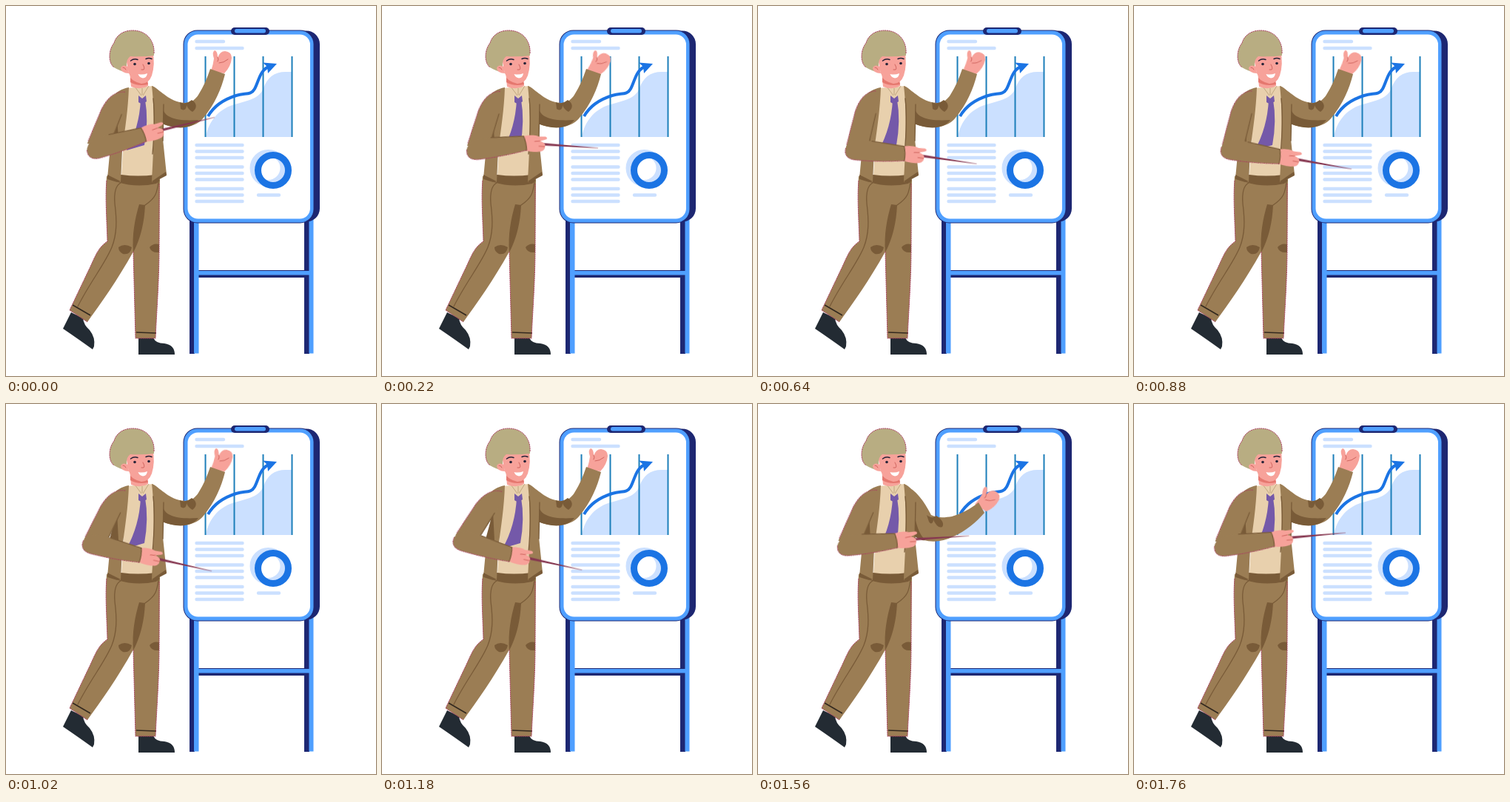
Animation of 500x500 px, one loop 1.8 s. Source, as an HTML page:

```html
<!DOCTYPE html>
<html lang="en">
<head>
<meta charset="utf-8">
<title>Presenter</title>
<style>
  html, body { margin: 0; width: 100%; height: 100%; overflow: hidden; background: #fff; }
  svg { display: block; width: 100vw; height: 100vh; }
  .coat { fill: #9b7d54; }
  .dark { fill: #795b38; }
  .skin { fill: #f7a29a; }
  .navy { fill: #1d2772; }
  .blue { fill: #4f9fff; }
  .pale { fill: #cbe0ff; }
  .crease { fill: none; stroke: #795b38; stroke-width: 1.3; stroke-linecap: round; }
  .fold { fill: none; stroke: #d0655f; stroke-width: 1; stroke-linecap: round; }
  .edge { fill: none; stroke: #a83f5f; stroke-width: 1; stroke-dasharray: 2 .7; }
  .ink { fill: none; stroke: #262338; stroke-width: 1.5; stroke-linecap: round; }

  .upper, .fore, .hand, .wrist, .fist, .sleeve, .under, .bend {
    animation: 1800ms linear infinite;
  }
  .upper { animation-name: upper; }
  .fore { animation-name: fore; }
  .hand { animation-name: hand; }
  .fist { animation-name: fist; }
  .wrist { animation-name: wrist; }
  .sleeve { animation-name: sleeve; }
  .under { animation-name: under; }
  .bend { animation-name: bend; }
  .wrist, .sleeve, .under, .bend { animation-timing-function: ease-in-out; }

  /* Pointing arm: shoulder, elbow and wrist angles */
  @keyframes upper {
    0% { transform: rotate(20.8deg); }
    12.22% { transform: rotate(16deg); }
    25.56% { transform: rotate(12.2deg); }
    48.89% { transform: rotate(12.8deg); }
    60% { transform: rotate(30deg); }
    65.56% { transform: rotate(31.5deg); }
    74.44% { transform: rotate(25deg); }
    91.11%, 100% { transform: rotate(21deg); }
  }
  @keyframes fore {
    0% { transform: rotate(-36.4deg); }
    12.22% { transform: rotate(-22.6deg); }
    25.56% { transform: rotate(-9.8deg); }
    48.89% { transform: rotate(-3.8deg); }
    60% { transform: rotate(-13.5deg); }
    65.56% { transform: rotate(-14.5deg); }
    74.44% { transform: rotate(-24.5deg); }
    91.11%, 100% { transform: rotate(-28deg); }
  }
  @keyframes hand {
    0% { transform: rotate(2deg); }
    12.22% { transform: rotate(10.6deg); }
    25.56% { transform: rotate(4.5deg); }
    48.89% { transform: rotate(1deg); }
    65.56% { transform: rotate(-4.5deg); }
    74.44% { transform: rotate(0deg); }
    91.11%, 100% { transform: rotate(2deg); }
  }

  /* Raised arm: dips once, the fist rocks */
  @keyframes fist {
    0%, 65.56%, 97.78%, 100% { transform: rotate(0deg); }
    12.22% { transform: rotate(13deg); }
    25.56% { transform: rotate(6deg); }
    48.89% { transform: rotate(8deg); }
    74.44%, 88.89% { transform: rotate(22deg); }
  }
  @keyframes wrist {
    0%, 66.67%, 97.78%, 100% { transform: translate(286px, 89px); }
    74.44%, 88.89% { transform: translate(301px, 140px); }
  }
  @keyframes sleeve {
    0%, 66.67%, 97.78%, 100% {
      d: path("M198 110 C212 114 218 129 242 131 C252 130 256 126 260 120 C267 109 272 97 276 85 L296 92 C291 112 282 133 267 151 C256 165 232 168 211 159 Z");
    }
    74.44%, 88.89% {
      d: path("M198 110 C214 116 224 131 234 150 C244 155 254 153 262 152 C276 148 288 141 298 133 L306 147 C295 160 280 172 264 179 C246 188 226 188 211 178 Z");
    }
  }
  @keyframes under {
    0%, 66.67%, 97.78%, 100% { d: path("M212 139 C215 151 231 156 260 154 C250 167 230 167 211 159 Z"); }
    74.44%, 88.89% { d: path("M211 148 C214 163 217 175 226 184 C223 185 217 183 211 178 Z"); }
  }
  @keyframes bend {
    0%, 66.67%, 97.78%, 100% { d: path("M235 130 C240 133 246 131 251 127 C258 131 259 138 252 143 C248 141 245 137 244 134 C244 140 240 142 236 139 Z"); }
    74.44%, 88.89% { d: path("M228 150 C233 154 237 154 241 151 C249 156 252 162 249 166 C244 169 238 160 237 156 C237 162 233 163 231 159 Z"); }
  }
</style>
</head>
<body>
<svg viewBox="0 0 500 500">
  <!-- Easel -->
  <g>
    <path class="navy" d="M248 288H255V470H248ZM403 288H410V470H403ZM260 357H410V367H260Z"/>
    <path class="blue" d="M254 288H260.500V469.500H254ZM409.500 288H415.500V469.500H409.500ZM260 358H409.500V363.500H260Z"/>
    <rect class="navy" x="248" y="33.500" width="176" height="258" rx="18"/>
    <rect class="navy" x="239.500" y="32.500" width="177" height="261" rx="19"/>
    <rect class="blue" x="240.500" y="33.500" width="175" height="259" rx="18"/>
    <rect x="245.500" y="38.500" width="165.500" height="249" rx="14" fill="#fff"/>
    <rect class="navy" x="304" y="29" width="52" height="10" rx="5"/>
    <rect class="blue" x="309" y="31" width="42" height="5.500" rx="2.700"/>
  </g>

  <!-- Chart -->
  <path class="pale" d="M270 177C273 160 283 143 303 135C322 128 341 128 348 111C353 97 362 89 378 89H386V177Z"/>
  <path d="M269.500 68V177M308.500 68V177M347.500 68V177M386.500 68V177" stroke="#1c7fba" stroke-width="2"/>
  <path d="M273 149C281 135 295 126 311 121C323 117 331 121 336 112C342 101 343 85 358 81" fill="none" stroke="#1b74e4" stroke-width="4"/>
  <path d="M366 78L347 76.500L353 82L354 91Z" fill="#1b74e4"/>
  <path d="M257.500 48H294M257.500 57H319.500M257.500 188H319.500M257.500 196.500H319.500M257.500 205H319.500M257.500 217.500H319.500M257.500 226H319.500M257.500 234.500H319.500M257.500 247H319.500M257.500 255.500H319.500M257.500 264H319.500M341 255.500H369"
        stroke="#cbe0ff" stroke-width="4.400" stroke-linecap="round"/>
  <g fill="none" stroke-width="9">
    <circle cx="354.500" cy="219" r="20.500" stroke="#cbe0ff"/>
    <circle cx="361" cy="222" r="20.500" stroke="#1b74e4"/>
  </g>

  <!-- Raised arm -->
  <g class="wrist"><g class="fist">
    <path class="skin" d="M-9 -1Q-6 -10 -5 -18Q-8 -27 -4 -29Q0 -28 0 -19Q3 -28 10 -28Q19 -27 19 -19Q18 -7 9 2Z"/>
    <path class="fold" d="M0 -20Q2 -17 0 -14M2 -12Q8 -12 14 -17"/>
  </g></g>
  <path class="coat sleeve" d="M198 110C212 114 218 129 242 131C252 130 256 126 260 120C267 109 272 97 276 85L296 92C291 112 282 133 267 151C256 165 232 168 211 159Z"/>
  <path class="dark under" d="M212 139C215 151 231 156 260 154C250 167 230 167 211 159Z"/>
  <path class="dark bend" d="M235 130C240 133 246 131 251 127C258 131 259 138 252 143C248 141 245 137 244 134C244 140 240 142 236 139Z"/>

  <!-- Shoes and trousers -->
  <path d="M88 414L104 422Q105 431 113 438Q121 448 119 460L117 464Q99 451 77 436ZM179 448H199Q202 456 214 456Q228 458 228 471H179Z" fill="#232b33"/>
  <path class="coat" d="M136 230C134 255 136 285 137 318C125 326 121 337 115 350L86 411L110 427C128 402 151 370 172 332L175 449H202C204 405 207 370 207 325L208 234Z"/>
  <path class="dark" d="M155 228H199L208 236L203 240Q176 246 151 238Z"/>
  <path class="dark" d="M188 269C187 292 182 314 172 333C170 310 174 288 180 268Z"/>
  <path class="crease" d="M206 238C204 252 203 259 188 269Q182 274 180 280"/>
  <path class="dark" d="M152 326Q160 320 170 326Q168 337 158 335Q152 332 152 326ZM194 326Q199 320 207 322V333Q196 334 194 326Z"/>
  <path class="crease" d="M155 239C147 243 146 254 147 267C150 290 150 308 143 326C134 348 113 374 97 406"/>
  <path d="M90 404L114 418M176 441L203 442" stroke="#33291f" stroke-width="1.600"/>
  <path class="edge" d="M136 236C134 258 136 285 137 318C125 326 121 337 115 350L86 411L110 427M172 332L175 449H202C204 405 207 370 207 325V240"/>

  <!-- Torso -->
  <path d="M163 111L199 108L202 228Q178 231 156 228Z" fill="#e8d0ad"/>
  <path d="M182 127L188 127Q193 155 187 188L163 195Q180 165 182 127ZM179 121L184 125L189 121L190 129L184 133L179 130Z" fill="#7459a9"/>
  <path d="M184 111V120M174 109L183 121M193 108L185 121" fill="none" stroke="#bda27b" stroke-width=".9"/>
  <path class="coat" d="M166 110C156 112 148 116 143 125L149 145L141 190L137 233L155 238L157 195C161 165 165 140 166 110Z"/>
  <path class="dark" d="M150 146L152 184L138 190ZM137 228L155 237L150 238L137 234Z"/>
  <path class="coat" d="M197 108C206 111 212 119 213 132L212 180L217 228L197 238C199 200 202 150 197 108Z"/>
  <path class="dark" d="M197 237L216 224L217 229L200 238Z"/>
  <path class="crease" d="M213 133L212 182M199 125Q202 155 198 200"/>

  <!-- Head -->
  <path class="skin" d="M167 88L169 109Q182 114 192 108L191 95Z"/>
  <path d="M168 97Q176 106 191 102L192 106Q178 109 168 103Z" fill="#e5786f"/>
  <path class="skin" d="M161 66L198 60Q202 78 197 94Q193 105 183 105Q171 103 166 91Z"/>
  <path d="M200 67C202 49 191 33 171 33C156 33 148 42 146 50C138 60 138 77 146 83Q154 88 164 90L163 81Q162 72 168 68Q186 69 200 67Z" fill="#b8ad82"/>
  <path class="skin" d="M166 91Q156 91 155 84Q157 78 165 82Z"/>
  <path class="edge" d="M200 64C201 48 191 33 171 33C156 33 148 42 146 50C138 60 138 77 146 83"/>
  <path class="ink" d="M168.500 74Q173 70.500 178 72.500M189 71.500Q193 69.500 197 71.500"/>
  <circle cx="174" cy="78.500" r="1.800" fill="#262338"/>
  <circle cx="193" cy="77.500" r="1.800" fill="#262338"/>
  <path class="fold" d="M185 79Q188 84 186 86L183 86M158 83Q161 83 162 86"/>
  <path d="M178.500 92Q185 93.500 191 91Q190 97.500 185 97.500Q180 96.500 178.500 92Z" fill="#fff"/>

  <!-- Pointing arm -->
  <g transform="translate(150 125)"><g class="upper">
    <path class="coat" d="M-14.500 22C-13 7 -8 -8 7 -12L14 -2L13 69L-16 71Z"/>
    <path class="edge" d="M7 -12C-8 -8 -13 7 -14.500 22L-16 68"/>
    <path class="crease" d="M13.500 18L13 58"/>
    <g transform="translate(0 70)"><g class="fore">
      <g transform="translate(63)"><g class="hand">
        <path d="M10 -2L99 -.3V.3L10 2Z" fill="#85354f"/>
        <path class="skin" d="M-3 -9Q10 -13 18 -10L27 -10.500Q32 -8 26 -6L20 -4Q29 -2 27 3Q28 8 22 10Q10 13 -3 9Z"/>
        <path class="fold" d="M20 -4L13 -3M27 3L19 3"/>
      </g></g>
      <path class="coat" d="M8 -13L62 -9.500Q65 0 64 10Q30 15 -3 15Q-18.500 14 -16.500 0Q-12 -13 8 -13Z"/>
      <path class="crease" d="M18 -12.300L62 -9.500Q65 0 64 10"/>
      <path class="edge" d="M64 10Q30 15 -3 15Q-18.500 14 -16.500 0"/>
    </g></g>
  </g></g>
</svg>
</body>
</html>
```
